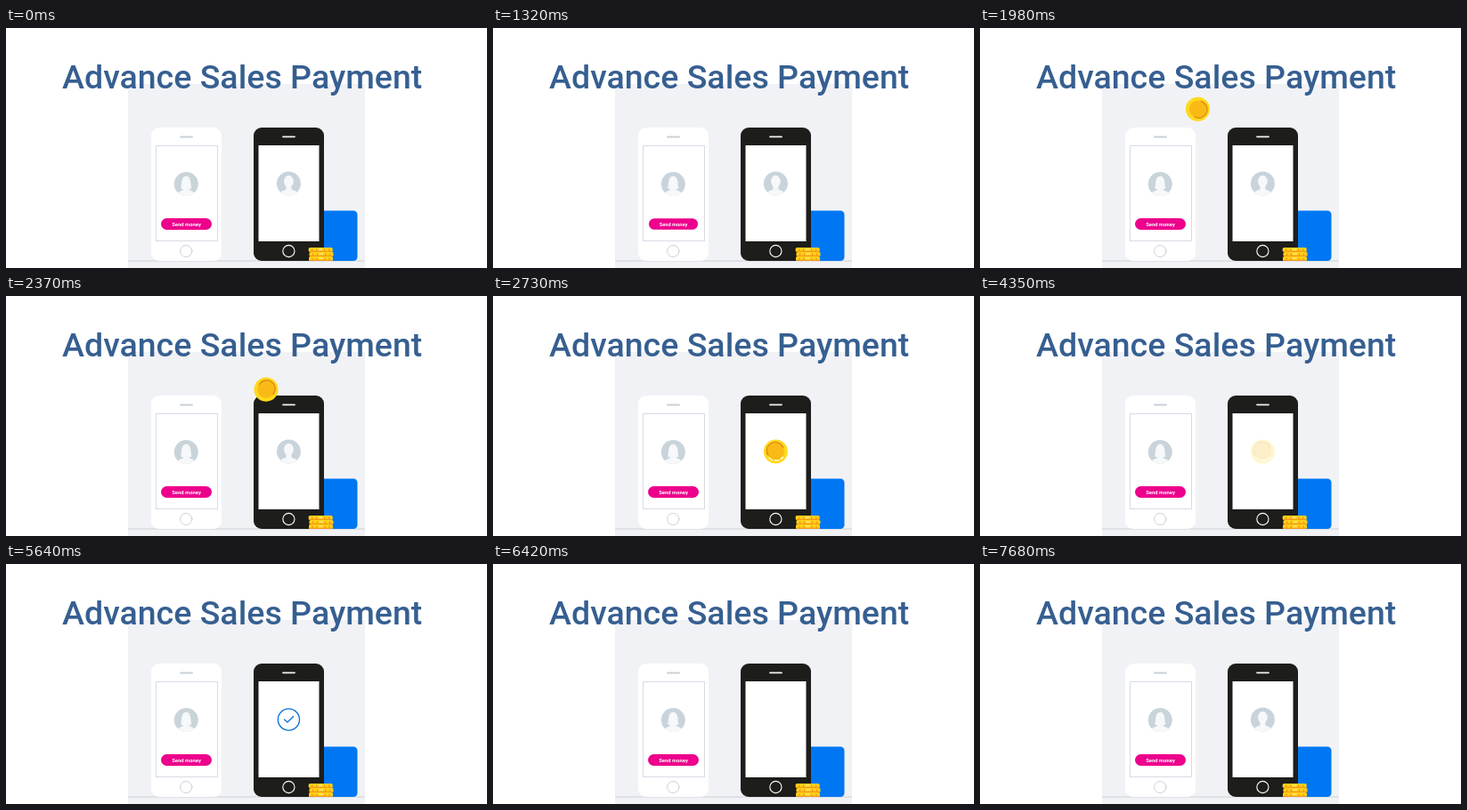
Recreate the animation shown at these times as an HTML page. Size 540x270 px, loop 8.64 s.

```html
<!DOCTYPE html>
<html lang="en">
<head>
<meta charset="utf-8">
<title>Advance Sales Payment</title>
<style>
  html, body { margin: 0; width: 100%; height: 100%; overflow: hidden; background: #fff; }
  svg { display: block; width: 540px; height: 270px; }
  .title { font: 500 37.5px Roboto, sans-serif; fill: #365f91; }
  .label { font: 700 5.9px Roboto, sans-serif; fill: #fff; text-anchor: middle; }
  .line { fill: none; stroke-linecap: round; stroke-linejoin: round; }
</style>
</head>
<body>
<svg viewBox="0 0 540 270">
  <defs>
    <clipPath id="disc"><circle r="13.5"/></clipPath>
    <g id="body">
      <circle r="13.5" fill="#c9d3da"/>
      <path d="M-10.5 14C-10 8-6 8-3 6.5V2H3V6.5C6 8 10 8 10.5 14Z" fill="#f6f8f9" clip-path="url(#disc)"/>
    </g>
    <g id="pile">
      <rect width="27" height="5" rx="1.6" fill="#ffd11a"/>
      <path d="M1 4.3H26M4 1.8V3.6M9 1.8V3.6M18 1.8V3.6M23 1.8V3.6" class="line" stroke="#f39a12" stroke-width="1.3"/>
      <path d="M11.5 2.2H15" class="line" stroke="#fff3b0"/>
    </g>
  </defs>

  <path d="M137 63H403V270H137Z" fill="#f1f2f5"/>
  <text class="title" x="63" y="68">Advance Sales Payment</text>
  <path d="M137 262H403" stroke="#cdd2d8"/>

  <rect x="163" y="112" width="79" height="150" rx="9" fill="#fff"/>
  <rect x="168.5" y="132.5" width="69" height="107" fill="#fff" stroke="#d7dbe5"/>
  <path d="M196 122.5H209" class="line" stroke="#c9d0d8" stroke-width="1.8"/>
  <circle cx="202.3" cy="251" r="6.6" class="line" stroke="#cbd1d8"/>
  <g transform="translate(202.3 175.5)">
    <use href="#body"/>
    <path d="M-6 5C-5 1-6-9 0-9S5 1 6 5Q3 7 0 5.5Q-3 7-6 5Z" fill="#f6f8f9"/>
  </g>
  <g id="button">
    <rect x="-28.5" y="-6.5" width="57" height="13" rx="6.5" fill="#ec008c"/>
    <text class="label" y="2.1">Send money</text>
  </g>

  <rect x="335" y="205.5" width="59.5" height="56.5" rx="4.5" fill="#0077f2"/>
  <rect x="278" y="112" width="79" height="150" rx="9" fill="#1d1d1b"/>
  <path d="M283.5 132H351.5V240H283.5Z" fill="#fff"/>
  <path d="M311 122.3H324" class="line" stroke="#f1f2f5" stroke-width="1.8"/>
  <circle cx="317.4" cy="251" r="6.6" class="line" stroke="#fff" stroke-width="1.1"/>
  <g id="avatar" transform="translate(317.4 175)">
    <use href="#body"/>
    <ellipse cy="-2.5" rx="5.4" ry="6.8" fill="#f6f8f9"/>
  </g>

  <use href="#pile" x="340" y="257"/>
  <use id="middle" href="#pile" x="340.5" y="252"/>
  <use id="top" href="#pile" x="339.7" y="247"/>

  <g id="done" class="line" stroke="#0a6fd6" stroke-width="1.3">
    <circle id="ring" cx="317.4" cy="175" r="12.1" pathLength="1" transform="rotate(-90 317.4 175)"/>
    <path id="tick" pathLength="1" d="M312.6 175L316 178L322.6 171.5"/>
  </g>

  <g id="coin">
    <circle r="13.5" fill="#ffd91c"/>
    <circle r="9.6" fill="#f9ba16"/>
    <path d="M-8.6 4.2A9.6 9.6 0 1 1 8.4-4.6" class="line" stroke="#df8a18" stroke-width="1.4"/>
    <path id="shine" d="M-7.2 7.2A10.2 10.2 0 0 0 8 6.3" class="line" stroke="#fff6c8" stroke-width="1.6" stroke-dasharray="4 3"/>
  </g>
</svg>
<script>
const LOOP = 8640, STEP = 30;
const el = id => document.getElementById(id);
const [button, avatar, middle, topCoin, done, ring, tick, coin, shine] =
  ['button', 'avatar', 'middle', 'top', 'done', 'ring', 'tick', 'coin', 'shine'].map(el);

const span = (t, a, b) => Math.min(1, Math.max(0, (t - a) / (b - a)));
const bump = (t, a, b) => Math.sin(Math.PI * span(t, a, b));
const smooth = u => u * u * (3 - 2 * u);
const fade = (node, alpha) => node.setAttribute('opacity', alpha);
const place = (node, x, y, scale = 1, turn = 0) =>
  node.setAttribute('transform', `translate(${x} ${y}) rotate(${turn}) scale(${scale})`);

function drawLine(node, u) {
  node.setAttribute('stroke-dasharray', `${u} 2`);
  node.setAttribute('visibility', u > 0 ? 'visible' : 'hidden');
}

// Symmetric cubic arc from the left phone to the right one
function arc(u) {
  const v = 1 - u;
  const across = 0.39 * u * v * v + 2.61 * u * u * v + u ** 3;
  return [202.3 + 115.1 * across, 175 - 350 * u * v];
}

function render(t) {
  place(button, 202.5, 220.5, 1 - 0.045 * bump(t, 930, 1470));

  const u = span(t, 1350, 2670) ** 1.25;
  const size = span(t, 1350, 1450) * (1 + 0.08 * bump(t, 2730, 2970));
  place(coin, ...arc(u), size, (1 - u) * 230);
  fade(coin, 1 - span(t, 4140, 4410));
  fade(shine, span(t, 2550, 2700));

  const lift = bump(t, 3150, 3660);
  place(topCoin, 0, -2.7 * lift);
  place(middle, 0, -1.3 * lift);

  drawLine(ring, smooth(span(t, 4590, 5460)));
  drawLine(tick, span(t, 5460, 5640));
  fade(done, 1 - span(t, 6090, 6420));
  fade(avatar, t < 2670 ? 1 : span(t, 7290, 7440));
}

const start = performance.now();
function tickFrame() {
  const t = (performance.now() - start) % LOOP;
  render(Math.floor(t / STEP) * STEP);
  requestAnimationFrame(tickFrame);
}
tickFrame();
</script>
</body>
</html>
```
